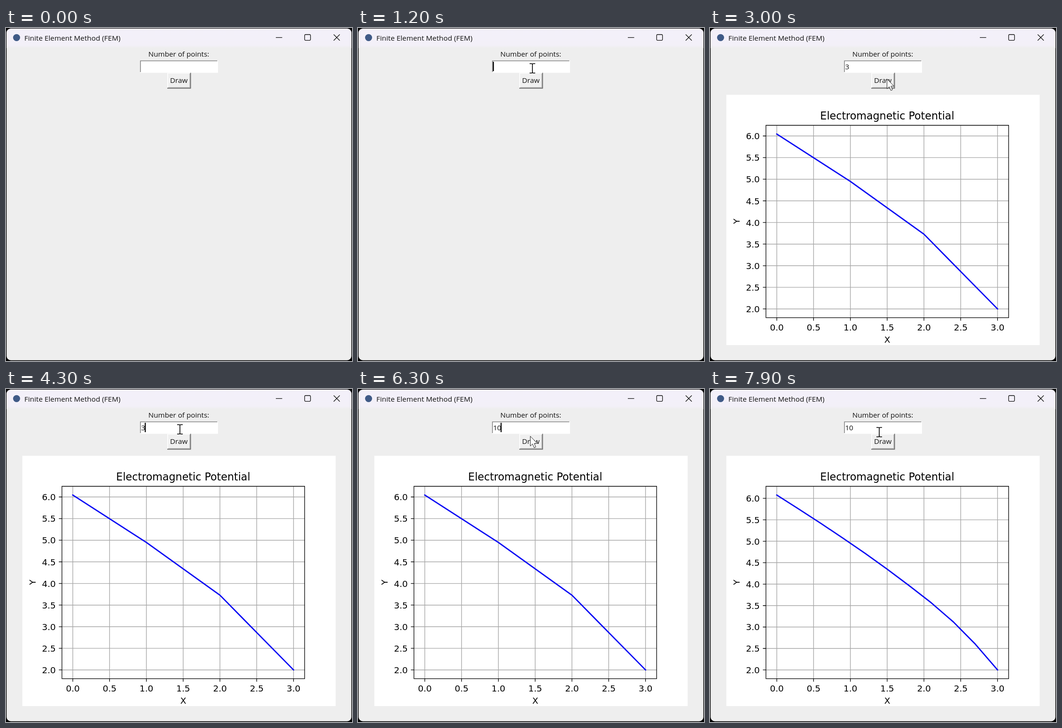
These frames come from a looping animation (736x710 px, 8000 ms). An HTML page:

```html
<!DOCTYPE html>
<html lang="en">
<head>
<meta charset="utf-8">
<title>Finite Element Method (FEM)</title>
<style>
  html, body { margin: 0; width: 100%; height: 100%; overflow: hidden; background: #000; }
  svg { display: block; width: 736px; height: 710px; }
  text { font: 15.2px "Open Sans", "Noto Sans", sans-serif; fill: #111; }
  .plot text { font: 18.5px "DejaVu Sans", sans-serif; fill: #000; }
  .plot .head { font-size: 22.2px; }
  .mid { text-anchor: middle; }
  .end { text-anchor: end; }
  .line { fill: none; }
  .grid { stroke: #a8a8a8; stroke-width: 1.4; }
  .axis { stroke: #000; stroke-width: 1.3; }
  .curve { stroke: #0000f4; stroke-width: 2.7; stroke-linejoin: round; stroke-linecap: square; }
</style>
</head>
<body>
<svg viewBox="0 0 736 710">
  <defs>
    <linearGradient id="bar" x1="0" x2="0" y1="0" y2="1">
      <stop offset="0" stop-color="#f3f0fa"/>
      <stop offset=".85" stop-color="#f3f0f8"/>
      <stop offset="1" stop-color="#eeeeee"/>
    </linearGradient>
    <clipPath id="frame"><rect x="1.3" y="1.2" width="733.4" height="707.3" rx="9"/></clipPath>
  </defs>
  <rect width="736" height="710"/>
  <g clip-path="url(#frame)">
    <rect width="736" height="710" fill="#eeeeee"/>
    <rect width="736" height="43" fill="url(#bar)"/>
  </g>

  <circle cx="22.5" cy="20.5" r="7.5" fill="#3f5a86"/>
  <text x="39" y="27" style="font-size:15.3px">Finite Element Method (FEM)</text>
  <g class="line" stroke="#111" stroke-width="1.3">
    <path d="M574 20.3H587.5M697 13.8L710 26.8M710 13.8L697 26.8"/>
    <rect x="635.3" y="14" width="12.4" height="12.4" rx="1.8"/>
  </g>

  <text class="mid" x="367.5" y="61.3">Number of points:</text>
  <rect x="285" y="69" width="166" height="26.5" fill="#fff"/>
  <path class="line" d="M286 94V70H449.5" stroke="#858585" stroke-width="1.6"/>
  <text id="value" x="287.4" y="88"></text>
  <rect id="caret" y="72" width="2.2" height="20"/>

  <rect x="343" y="95.5" width="50" height="33" fill="#f0f0f0"/>
  <path id="topEdge" class="line" d="M343.8 128.5V96.2H393" stroke-width="1.6"/>
  <path id="lowEdge" class="line" d="M343 128.4H392.6V95.5" stroke-width="1.6"/>
  <path id="lowShade" class="line" d="M345 126.9H391.1V97" stroke="#a8a8a8" stroke-width="1.4"/>
  <text id="label" class="mid" x="367.6" y="117.3">Draw</text>

  <g id="plots" class="plot"></g>

  <path id="arrow" d="M.5 .7V21.6L5.3 17.2L8.8 25.2L12.2 23.7L8.8 16H15.4Z"
        fill="#fff" stroke="#222" stroke-width="1" stroke-linejoin="round"/>
  <path id="beam" class="line" d="M-6 -10H-2Q0 -10 0 -8V8Q0 10 -2 10H-6M6 -10H2Q0 -10 0 -8M0 8Q0 10 2 10H6"
        stroke="#000" stroke-width="1.6"/>
</svg>
<script>
const LOOP = 8000, STEP = 100;
const $ = id => document.getElementById(id);

// Values hold until the next start time.
const typed = [[0, ''], [1700, '3'], [4800, ''], [5400, '1'], [5700, '10']];
const focus = [[1100, 2900], [4300, 6800]];
const presses = [[2700, 2900], [6600, 6800]];

// Pointer rests and turning points: time, x, y.
const path = [
  [100, 724, 284], [600, 326, 54], [900, 392, 96], [1200, 371, 86],
  [1900, 371, 86], [2200, 369, 72], [2600, 376, 108],
  [3400, 376, 108], [3600, 358, 73], [3800, 370, 86],
  [6100, 370, 86], [6300, 366, 100], [6500, 368, 112],
  [7300, 368, 112], [7500, 352, 97], [7800, 360, 92]
];

const within = (spans, t) => spans.find(([a, b]) => t >= a && t < b);
const show = (el, on) => el.setAttribute('visibility', on ? 'visible' : 'hidden');

function pointerAt(t) {
  const i = path.findLastIndex(p => p[0] <= t);
  if (i < 0) return null;
  const [t0, x0, y0] = path[i];
  const [t1, x1, y1] = path[i + 1] || [LOOP, x0, y0];
  const u = (t - t0) / (t1 - t0), e = u * u * (3 - 2 * u);
  return [x0 + (x1 - x0) * e, y0 + (y1 - y0) * e];
}

// Finite elements for u'' = -1/eps on [0, 3] with u(0) + u'(0) = 5 and u(3) = 2.
// Each hat function's load uses two-point Gauss quadrature over its support.
function solve(n) {
  const h = 3 / n, g = 1 / Math.sqrt(3);
  const inv = x => x <= 1 ? 1 / 10 : x <= 2 ? 1 / 5 : 1;
  const load = i => i ? h * (1 - g) * (inv((i - g) * h) + inv((i + g) * h)) : h / 20;
  let bend = 0;
  for (let i = 0; i < n; i++) bend += load(i) * (3 - i * h);
  let slope = (bend - 3) / 2;
  const u = [5 - slope];
  for (let i = 0; i < n; i++) {
    slope -= load(i);
    u.push(u[i] + slope * h);
  }
  return u;
}

function plot(n) {
  const L = 119, R = 635.3, T = 207.5, B = 617.6;
  const ys = solve(n), pad = (B - T) / 22;
  const px = x => 142.1 + 156.5 * x;
  const py = y => B - pad - (y - 2) / (ys[0] - 2) * 20 * pad;
  let grid = '', ticks = '', labels = '';
  for (let x = 0; x <= 3; x += .5) {
    grid += `M${px(x)} ${T}V${B}`;
    ticks += `M${px(x)} ${B}v6.5`;
    labels += `<text class="mid" x="${px(x)}" y="645">${x.toFixed(1)}</text>`;
  }
  for (let y = 2; y <= 6; y += .5) {
    grid += `M${L} ${py(y)}H${R}`;
    ticks += `M${L} ${py(y)}h-6.5`;
    labels += `<text class="end" x="105.8" y="${py(y) + 7}">${y.toFixed(1)}</text>`;
  }
  const curve = ys.map((y, i) => `${px(3 * i / n)},${py(y)}`).join(' ');
  return `<g>
    <rect x="34.7" y="142.4" width="666.6" height="533.6" fill="#fff"/>
    <path class="line grid" d="${grid}"/>
    <polyline class="line curve" points="${curve}"/>
    <path class="line axis" d="${ticks}M${L} ${T}H${R}V${B}H${L}Z"/>
    ${labels}
    <text class="mid head" x="377" y="195.3">Electromagnetic Potential</text>
    <text class="mid" x="377" y="671">X</text>
    <text class="mid" transform="translate(62.8 412) rotate(-90)">Y</text>
  </g>`;
}

$('plots').innerHTML = plot(3) + plot(10);
const charts = [...$('plots').children];

function render(now) {
  const t = Math.floor(now % LOOP / STEP) * STEP;

  const text = typed.findLast(k => k[0] <= t)[1];
  const focused = within(focus, t);
  $('value').textContent = text;
  $('caret').setAttribute('x', 286.9 + 8.2 * text.length);
  show($('caret'), focused && (t - focused[0]) % 900 < 600);

  const down = within(presses, t);
  $('topEdge').setAttribute('stroke', down ? '#6a6a6a' : '#fff');
  $('lowEdge').setAttribute('stroke', down ? '#fff' : '#5f5f5f');
  show($('lowShade'), !down);
  $('label').setAttribute('transform', down ? 'translate(1 1)' : '');

  // Releasing the button draws the next chart.
  const drawn = presses.filter(p => p[1] <= t).length;
  charts.forEach((c, i) => show(c, i === drawn - 1));

  const [x, y] = pointerAt(t) || [-99, -99];
  const overField = x > 285 && x < 451 && y > 69 && y < 95;
  for (const id of ['arrow', 'beam']) {
    $(id).setAttribute('transform', `translate(${x} ${y})`);
    show($(id), (id === 'beam') === overField);
  }
}

const start = performance.now();
function tick() {
  render(performance.now() - start);
  requestAnimationFrame(tick);
}
tick();
</script>
</body>
</html>
```
